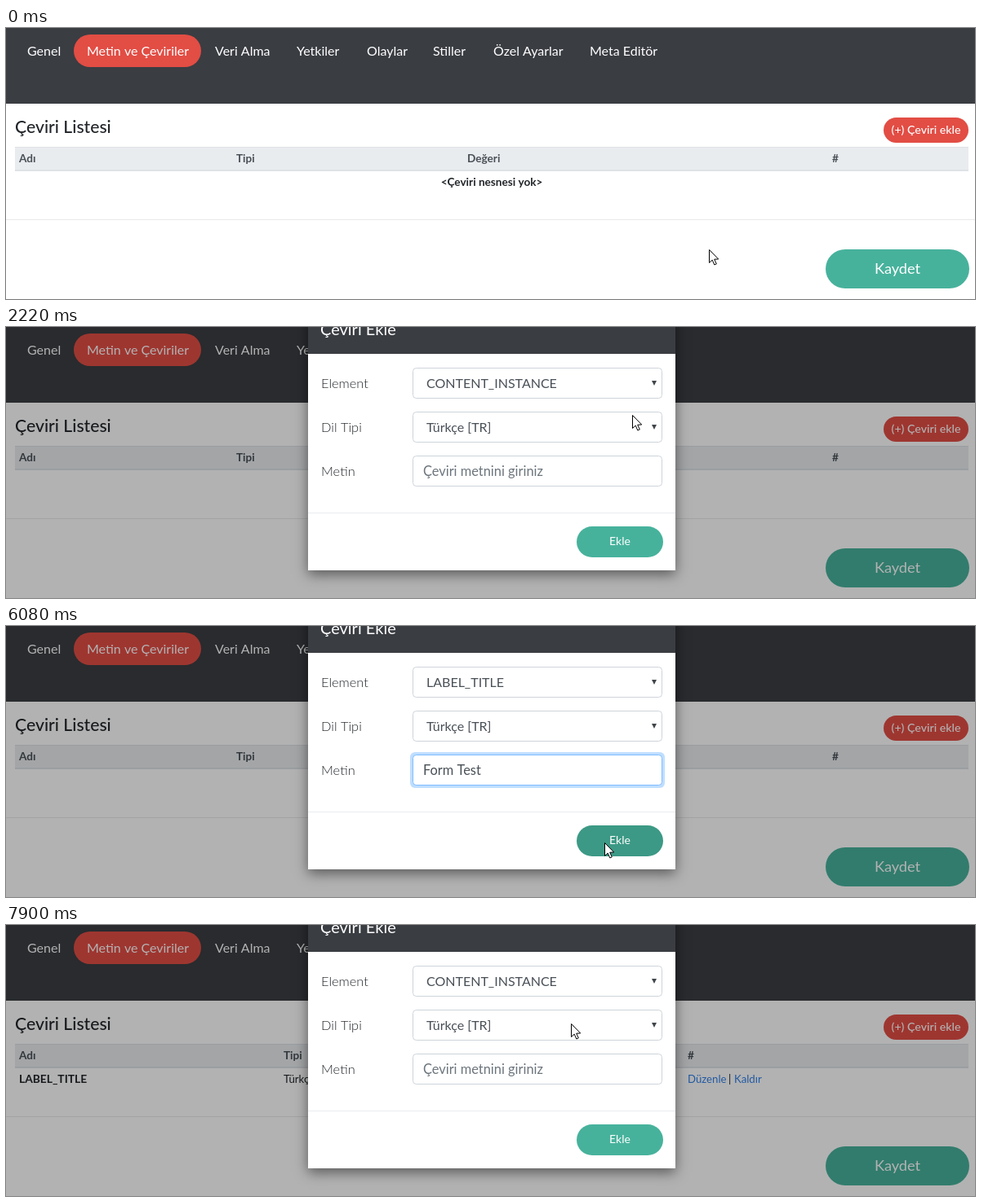
Write an HTML page with a canvas that moves like this. It is 1187 px wide and 333 px high and loops after 8000 ms.

```html
<!DOCTYPE html>
<html lang="tr">
<head>
<meta charset="utf-8">
<style>
  html, body { margin: 0; width: 1187px; height: 333px; overflow: hidden; background: #fff; }
  canvas { display: block; }
</style>
</head>
<body>
<canvas id="stage" width="1187" height="333"></canvas>
<script>
const W = 1187, H = 333, LOOP = 8000;
const c = document.getElementById('stage').getContext('2d');

const DARK = '#3a3d42', RED = [226, 77, 68], BLUE = [58, 92, 169];
const TEAL = [71, 178, 156], TEAL_DARK = [60, 153, 133];

// The screen refreshes in short steps, counted from these moments.
const SECTIONS = [0, 920, 1820, 2720, 3570, 4400, 4840, 5680, 6500, 7400];

// Pointer stops: time, x, y
const PATH = [
  [0, 861, 272], [20, 861, 272], [800, 1121, 130], [1020, 1121, 128],
  [1720, 1121, 128], [2220, 767, 108], [2620, 640, 72], [2820, 640, 72],
  [3320, 618, 118], [3570, 618, 118], [3770, 618, 145], [4270, 612, 171],
  [5240, 612, 171], [5560, 733, 266], [6120, 733, 266], [6400, 806, 227],
  [7200, 1116, 122], [7450, 1116, 122], [7900, 692, 121], [8000, 692, 121]
];

const NAV = [
  ['Genel', 26], ['Metin ve Çeviriler', 99], ['Veri Alma', 256], ['Yetkiler', 356],
  ['Olaylar', 442], ['Stiller', 523], ['Özel Ayarlar', 597], ['Meta Editör', 715]
];

const ramp = (t, start, len) => Math.max(0, Math.min(1, (t - start) / len));
const easeOut = p => 1 - (1 - p) ** 3;
const smooth = p => p * p * (3 - 2 * p);
const mix = (a, b, p) => `rgb(${a.map((v, i) => Math.round(v + (b[i] - v) * p)).join()})`;

function snap(t) {
  const start = SECTIONS.filter(s => s <= t).pop();
  const step = start === 4840 ? 50 : 100;
  return start + Math.floor((t - start) / step) * step;
}

function pointerAt(t) {
  let i = 1;
  while (i < PATH.length - 1 && PATH[i][0] < t) i++;
  const [t0, x0, y0] = PATH[i - 1], [t1, x1, y1] = PATH[i];
  const p = ramp(t, t0, t1 - t0);
  // long trips start and stop gently
  const k = t1 - t0 > 600 ? smooth(p) : p;
  return [Math.round(x0 + (x1 - x0) * k), Math.round(y0 + (y1 - y0) * k)];
}

function rect(x, y, w, h, color) {
  c.fillStyle = color;
  c.fillRect(x, y, w, h);
}

function text(str, x, y, size, color, weight = 400, align = 'left') {
  c.font = `${weight} ${size}px Lato, "Open Sans", sans-serif`;
  c.textAlign = align;
  c.fillStyle = color;
  c.fillText(str, x, y);
}

function round(x, y, w, h, r) {
  c.beginPath();
  c.roundRect(x, y, w, h, r);
}

function pill(x, y, w, h, color) {
  round(x, y, w, h, h / 2);
  c.fillStyle = color;
  c.fill();
}

function drawTable(filled) {
  rect(11, 146, 1168, 30, '#e9ecef');
  rect(11, 146, 1168, 1, '#dee2e6');
  rect(11, 174, 1168, 2, '#dee2e6');
  const cols = filled ? [16, 340, 598, 835] : [16, 282, 565, 1012];
  ['Adı', 'Tipi', 'Değeri', '#'].forEach((s, i) => text(s, cols[i], 165, 13.6, '#495057', 700));
  if (!filled) {
    text('<Çeviri nesnesi yok>', 595, 194, 13.6, '#212529', 700, 'center');
    return;
  }
  text('LABEL_TITLE', 16, 194, 13.8, '#212529', 700);
  text('Türkçe [TR]', 340, 194, 13.2, '#212529');
  text('Form Test', 598, 194, 13.2, '#212529');
  text('Düzenle', 835, 194, 13.2, '#2f7fe6');
  text('|', 885, 194, 13.2, '#212529');
  text('Kaldır', 892, 194, 13.2, '#2f7fe6');
}

function drawPage(t) {
  rect(0, 0, W, H, '#fff');
  rect(0, 0, W, 93, DARK);
  pill(83, 8, 156, 40, mix(RED, RED, 0));
  NAV.forEach(([s, x]) => text(s, x, 34, 16, '#fff'));
  text('Çeviri Listesi', 11, 129, 21.2, '#212529', 500);

  const hover = ramp(t, 870, 300) - ramp(t, 1550, 300) + ramp(t, 7190, 300) - ramp(t, 7490, 300);
  pill(1075, 110, 104, 31, mix(RED, BLUE, hover));
  text('(+) Çeviri ekle', 1127, 130, 14.2, '#fff', 500, 'center');

  drawTable(t >= 6150);
  rect(0, 235, W, 1, '#e8e9ea');
  pill(1004, 272, 176, 48, mix(TEAL, TEAL, 0));
  text('Kaydet', 1092, 302, 18.2, '#fff', 400, 'center');
}

function drawField(y, str, color, focus, isSelect) {
  if (focus > 0) {
    round(495, y - 3, 312, 44, 6);
    c.fillStyle = `rgba(0,123,255,${0.25 * focus})`;
    c.fill();
  }
  round(498.5, y + 0.5, 305, 37, 4);
  c.fillStyle = '#fff';
  c.fill();
  c.lineWidth = 1;
  c.strokeStyle = mix([206, 212, 218], [128, 189, 255], focus);
  c.stroke();
  text(str, isSelect ? 515 : 511, y + 25, isSelect ? 16 : 16.4, color);
  if (isSelect) {
    c.beginPath();
    c.moveTo(791, y + 16);
    c.lineTo(797, y + 16);
    c.lineTo(794, y + 22);
    c.fillStyle = '#40454a';
    c.fill();
  }
}

function drawOptions(pointerY) {
  const active = pointerY > 108 ? 1 : 0;
  rect(498, 88, 306, 42, '#7f9db9');
  rect(499, 89, 304, 40, '#fff');
  ['CONTENT_INSTANCE', 'LABEL_TITLE'].forEach((s, i) => {
    if (i === active) rect(499, 89 + i * 20, 304, 20, '#1e90ff');
    text(s, 515, 104 + i * 20, 16, i === active ? '#fff' : '#495057');
  });
}

function drawModal(t, pointerY) {
  const typed = 'Form Test'.slice(0, Math.max(0, Math.floor((t - 4780) / 60)));
  const value = t < 7000 ? typed : '';
  const choice = t >= 3570 && t < 7000 ? 'LABEL_TITLE' : 'CONTENT_INSTANCE';
  const selectFocus = ramp(t, 2670, 150) - ramp(t, 4430, 150);
  const inputFocus = t < 7000 ? ramp(t, 4430, 150) : 0;

  c.save();
  c.shadowColor = 'rgba(0,0,0,.5)';
  c.shadowBlur = 15;
  c.shadowOffsetY = 5;
  rect(370, -30, 450, 329, '#fff');
  c.restore();
  rect(370, -30, 450, 63, DARK);
  text('Çeviri Ekle', 385, 10, 20, '#fff');

  ['Element', 'Dil Tipi', 'Metin'].forEach((s, i) => text(s, 386, 75 + i * 54, 16.4, '#212529', 300));
  drawField(50, choice, '#495057', selectFocus, true);
  drawField(104, 'Türkçe [TR]', '#495057', 0, true);
  drawField(158, value || 'Çeviri metnini giriniz', value ? '#495057' : '#6c757d', inputFocus, false);

  rect(370, 228, 450, 1, '#e9ecef');
  pill(699, 245, 106, 38, mix(TEAL, TEAL_DARK, ramp(t, 5480, 100) - ramp(t, 6180, 100)));
  text('Ekle', 752, 268, 14, '#fff', 400, 'center');

  if (t >= 2820 && t < 3570) drawOptions(pointerY);
}

function drawPointer(x, y) {
  const pts = [[0, 0], [0, 16], [3.7, 12.6], [6.3, 18.5], [8.8, 17.4], [6.2, 11.7], [11.2, 11.5]];
  c.beginPath();
  pts.forEach(([dx, dy]) => c.lineTo(x + 0.5 + dx, y + 0.5 + dy));
  c.closePath();
  c.fillStyle = '#fff';
  c.fill();
  c.lineWidth = 1;
  c.strokeStyle = '#000';
  c.stroke();
}

function draw(t) {
  const [px, py] = pointerAt(t);
  drawPage(t);

  const shade = ramp(t, 1520, 150) - ramp(t, 6250, 150) + ramp(t, 7440, 150);
  rect(0, 0, W, H, `rgba(0,0,0,${0.3 * shade})`);

  const alpha = ramp(t, 1520, 150) - ramp(t, 6120, 150) + ramp(t, 7440, 150);
  const down = easeOut(ramp(t, 1520, 300)) - easeOut(ramp(t, 6120, 300)) + easeOut(ramp(t, 7440, 300));
  if (alpha > 0) {
    c.save();
    c.globalAlpha = alpha;
    c.translate(0, Math.round(-80 * (1 - down)));
    drawModal(t, py);
    c.restore();
  }
  drawPointer(px, py);
}

const begin = performance.now();
function tick() {
  draw(snap((performance.now() - begin) % LOOP));
  requestAnimationFrame(tick);
}
tick();
</script>
</body>
</html>
```
